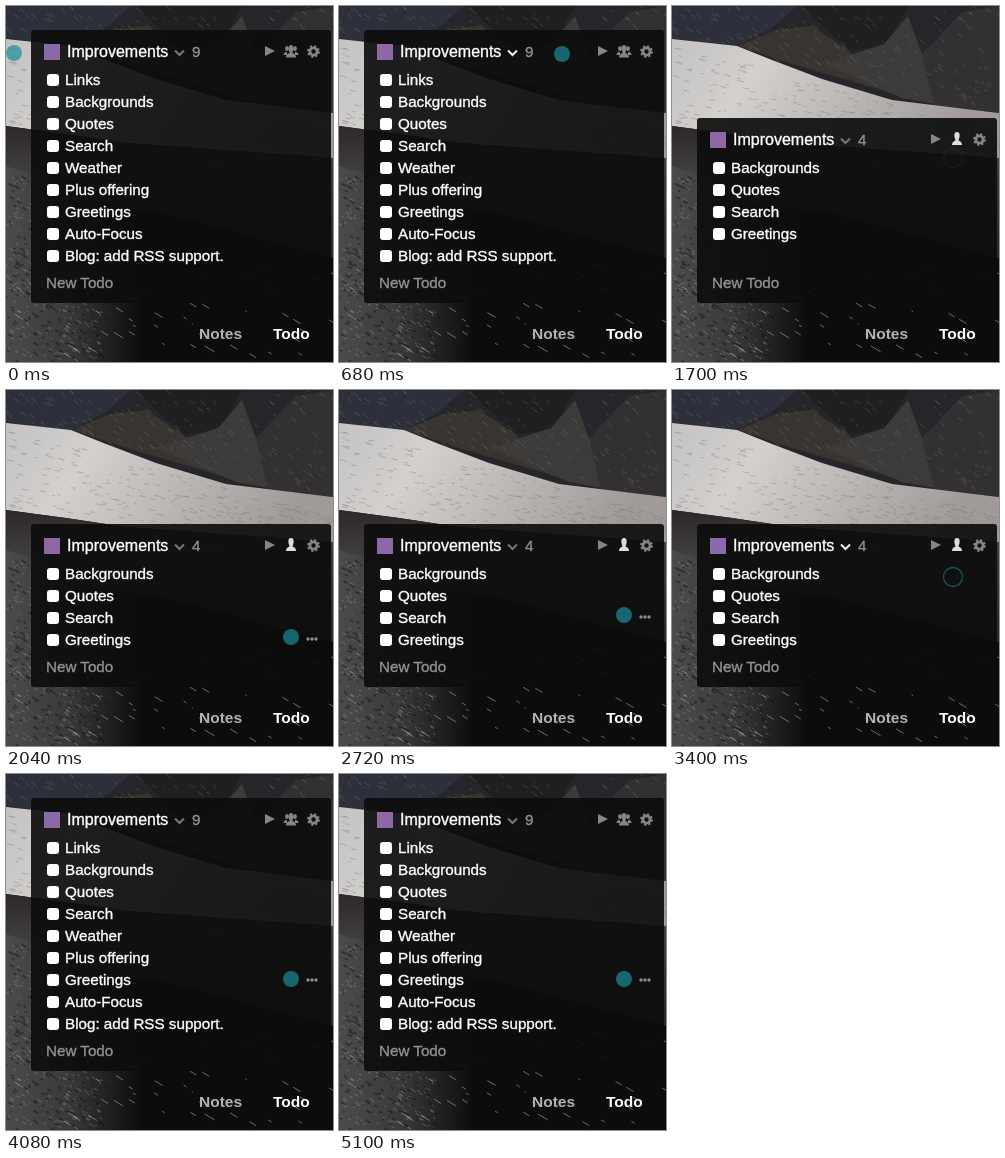
An HTML page that plays this animation: 327 px wide and 356 px high, repeating every 5.27 s.

```html
<!DOCTYPE html>
<html lang="en">
<head>
<meta charset="utf-8">
<title>Todo panel</title>
<style>
  html, body { margin: 0; width: 100%; height: 100%; overflow: hidden; background: #0c0c0d; }
  svg { display: block; width: 327px; height: 356px; }
  text { font: 15.2px "Liberation Sans", Arial, sans-serif; fill: #fff; stroke: #fff; stroke-width: .35px; }
  .title { font-size: 16px; }
  .muted { fill: #929292; stroke: #929292; }
  .tab { font-size: 15.5px; font-weight: bold; stroke: none; }
  .idle { fill: #b4b4b4; }
</style>
</head>
<body>
<svg viewBox="0 0 327 356">
  <defs>
    <linearGradient id="ice" x2="1" y2=".25">
      <stop stop-color="#c4c3c3"/><stop offset=".3" stop-color="#d3d0cd"/><stop offset="1" stop-color="#a09b99"/>
    </linearGradient>
    <linearGradient id="slope" x2=".1" y2="1">
      <stop stop-color="#2c2827"/><stop offset=".35" stop-color="#413e3e"/><stop offset="1" stop-color="#2b2a2b"/>
    </linearGradient>
    <linearGradient id="gravel">
      <stop stop-color="#4b4a4c"/><stop offset=".45" stop-color="#3a393b"/><stop offset="1" stop-color="#3a393b" stop-opacity="0"/>
    </linearGradient>
    <clipPath id="listArea"><path d="M25 0H325V265H25Z"/></clipPath>
  </defs>

  <g>
    <path fill="#262529" d="M0 0H327V120H0Z"/>
    <path fill="#2d303b" d="M0 0H125L100 22 66 40 0 33Z"/>
    <path fill="#38342f" d="M66 40L104 24 140 20 176 44 230 90 120 58Z"/>
    <path fill="#1f1e21" d="M130 0H236L214 40 178 44 150 20Z"/>
    <path fill="#3d3a3a" d="M150 58L212 38 236 10 250 48 275 100 230 92Z"/>
    <path fill="#323033" d="M250 48L290 6 327 0V108L262 100Z"/>
    <path fill="url(#ice)" d="M0 33L65 40 100 54 150 73 220 94 327 107V152L120 137 60 128 0 120Z"/>
    <path fill="url(#slope)" d="M0 120L60 128 120 137 327 152V252L150 205 0 190Z"/>
    <path fill="url(#gravel)" d="M0 160L25 168 135 200V356H0Z"/>
    <path id="rockMarks" stroke="#837e7c" stroke-opacity=".35"/>
    <path id="iceMarks" stroke="#7d797a" stroke-opacity=".4"/>
    <path id="gravelMarks" stroke="#b5b4b9" stroke-opacity=".35"/>
    <path id="gravelShade" stroke="#101012" stroke-opacity=".5" stroke-width="1.500"/>
    <path id="sandMarks" stroke="#c8c8ca" stroke-opacity=".5"/>
  </g>

  <rect id="panel" x="25" width="300" rx="3" fill="#0d0d0d" fill-opacity=".91"/>
  <g clip-path="url(#listArea)">
    <g id="content">
      <path fill="#8d68a6" d="M38 14H54V30H38Z"/>
      <text class="title" x="61" y="27">Improvements</text>
      <path id="chevron" d="M169 20.500L173.500 25L178 20.500" fill="none" stroke-width="2"/>
      <text id="count" class="muted" x="186" y="27"></text>
      <path fill="#858585" d="M259 16L269 21 259 26Z"/>
      <g id="group">
        <ellipse cx="281" cy="18.500" rx="1.900" ry="2.600"/>
        <ellipse cx="289" cy="18.500" rx="1.900" ry="2.600"/>
        <path d="M277.500 25Q277.500 22.500 281 21.800V25ZM292.500 25Q292.500 22.500 289 21.800V25Z"/>
        <ellipse cx="285" cy="18.500" rx="2.400" ry="3.600"/>
        <path d="M280 27.500Q280 24 283.500 23V20H286.500V23Q290 24 290 27.500Z"/>
      </g>
      <path id="single" fill="#ddd" d="M280 27Q280 23.500 283.500 22.500Q280.500 14 285 14Q289.500 14 286.500 22.500Q290 23.500 290 27Z"/>
      <g fill="none" stroke="#858585" transform="translate(307.5 21.500)">
        <circle r="3.600" stroke-width="2.800"/>
        <circle r="5.400" stroke-width="2" stroke-dasharray="2.120"/>
      </g>
      <g id="list"></g>
    </g>
  </g>

  <text class="muted" x="40" y="282">New Todo</text>
  <text class="tab idle" x="193" y="333">Notes</text>
  <text class="tab" x="267" y="333">Todo</text>

  <path id="dots" d="M302 0h0M306 0h0M310 0h0" stroke="#8c8c8c" stroke-width="3.400" stroke-linecap="round"/>
  <circle id="ring" r="9.500" fill="none" stroke="#1e8f98" stroke-width="1.300"/>
  <circle id="cursor" r="8" fill="#1c8c98" fill-opacity=".7"/>
</svg>

<script>
const LOOP = 5270, BOTTOM = 297, ROW = 22;
const $ = id => document.getElementById(id);

const items = ["Links", "Backgrounds", "Quotes", "Search", "Weather",
  "Plus offering", "Greetings", "Auto-Focus", "Blog: add RSS support."];
const mine = ["Backgrounds", "Quotes", "Search", "Greetings"];

// Each step changes only the listed properties and holds the rest.
const steps = [
  [0, { top: 24, filtered: false, cursor: [8, 47], ring: null, dots: null, hover: false, team: false }],
  [170, { cursor: null, ring: [4, 67, .55] }],
  [340, { ring: [4, 67, .3] }],
  [510, { ring: null, cursor: [16, 68] }],
  [680, { cursor: [223, 48], hover: true }],
  [850, { cursor: [262, 48] }],
  [1020, { cursor: [264, 47] }],
  [1190, { cursor: [284, 47], team: true }],
  [1360, { cursor: null, ring: [281, 67, .55] }],
  [1530, { filtered: true, top: 27, ring: [281, 67, .3] }],
  [1700, { top: 112, ring: [281, 152, .1], hover: false }],
  [1870, { top: 134, ring: null, cursor: [285, 154] }],
  [2040, { cursor: [285, 247], dots: 249 }],
  [2720, { cursor: [285, 225], dots: 227 }],
  [2890, { cursor: [285, 190], dots: 184 }],
  [3060, { cursor: [285, 172], dots: null, hover: true }],
  [3230, { cursor: [285, 167] }],
  [3400, { cursor: null, ring: [281, 187, .55] }],
  [3570, { filtered: false, top: 52, ring: [281, 187, .35] }],
  [3740, { top: 24, ring: [281, 187, .18] }],
  [3910, { ring: null, cursor: [285, 168] }],
  [4080, { cursor: [285, 205], dots: 206, hover: false, team: false }]
];

let seed = 7;
const random = () => (seed = seed * 16807 % 2147483647) / 2147483647;

// Scatters short strokes over a width, between two height profiles.
function scatter(id, count, width, upper, lower, length, slope) {
  let d = "";
  for (let i = 0; i < count; i++) {
    const x = random() * width, from = upper(x);
    const y = from + random() * (lower(x) - from);
    const dx = 1 + random() * length;
    d += `M${x.toFixed(1)} ${y.toFixed(1)}l${dx.toFixed(1)} ${(dx * slope).toFixed(1)}`;
  }
  $(id).setAttribute("d", d);
}
const iceTop = x => 30 + x * .27;
const gravelTop = x => 165 + x * .3;
scatter("rockMarks", 170, 327, () => 0, x => iceTop(x) - 5, 5, .8);
scatter("iceMarks", 300, 327, x => iceTop(x) + 8, x => 118 + x * .1, 6, .2);
scatter("gravelMarks", 320, 95, gravelTop, () => 356, 3, .6);
scatter("gravelShade", 260, 100, gravelTop, () => 356, 4, .6);
scatter("sandMarks", 60, 327, x => 268 - x * .04, () => 356, 9, .6);

const svgNode = (tag, attributes, parent) => {
  const node = document.createElementNS("http://www.w3.org/2000/svg", tag);
  for (const name in attributes) node.setAttribute(name, attributes[name]);
  return parent.appendChild(node);
};
const rows = items.map(label => {
  const node = svgNode("g", {}, $("list"));
  svgNode("rect", { x: 41, y: -6, width: 12, height: 12, rx: 3, fill: "#fff" }, node);
  svgNode("text", { x: 59, y: 5 }, node).textContent = label;
  return { label, node };
});

const show = (node, visible) => node.setAttribute("display", visible ? "inline" : "none");
const place = (node, x, y) => node.setAttribute("transform", `translate(${x} ${y})`);

function draw(time) {
  const state = Object.assign({}, ...steps.filter(([start]) => start <= time).map(step => step[1]));
  const { top, filtered, cursor, ring, dots, hover, team } = state;

  $("panel").setAttribute("y", top);
  $("panel").setAttribute("height", BOTTOM - top);
  place($("content"), 0, top);
  $("count").textContent = filtered ? mine.length : items.length;
  $("chevron").setAttribute("stroke", hover ? "#eee" : "#777");
  $("group").setAttribute("fill", team ? "#bbb" : "#858585");
  show($("group"), !filtered);
  show($("single"), filtered);

  let index = 0;
  for (const { label, node } of rows) {
    const visible = !filtered || mine.includes(label);
    show(node, visible);
    if (visible) place(node, 0, 50 + ROW * index++);
  }

  show($("cursor"), cursor);
  if (cursor) place($("cursor"), ...cursor);
  show($("ring"), ring);
  if (ring) {
    place($("ring"), ring[0], ring[1]);
    $("ring").setAttribute("opacity", ring[2]);
  }
  show($("dots"), dots !== null);
  if (dots !== null) place($("dots"), 0, dots);
}

const began = performance.now();
function tick() {
  draw((performance.now() - began) % LOOP);
  requestAnimationFrame(tick);
}
tick();
</script>
</body>
</html>
```
